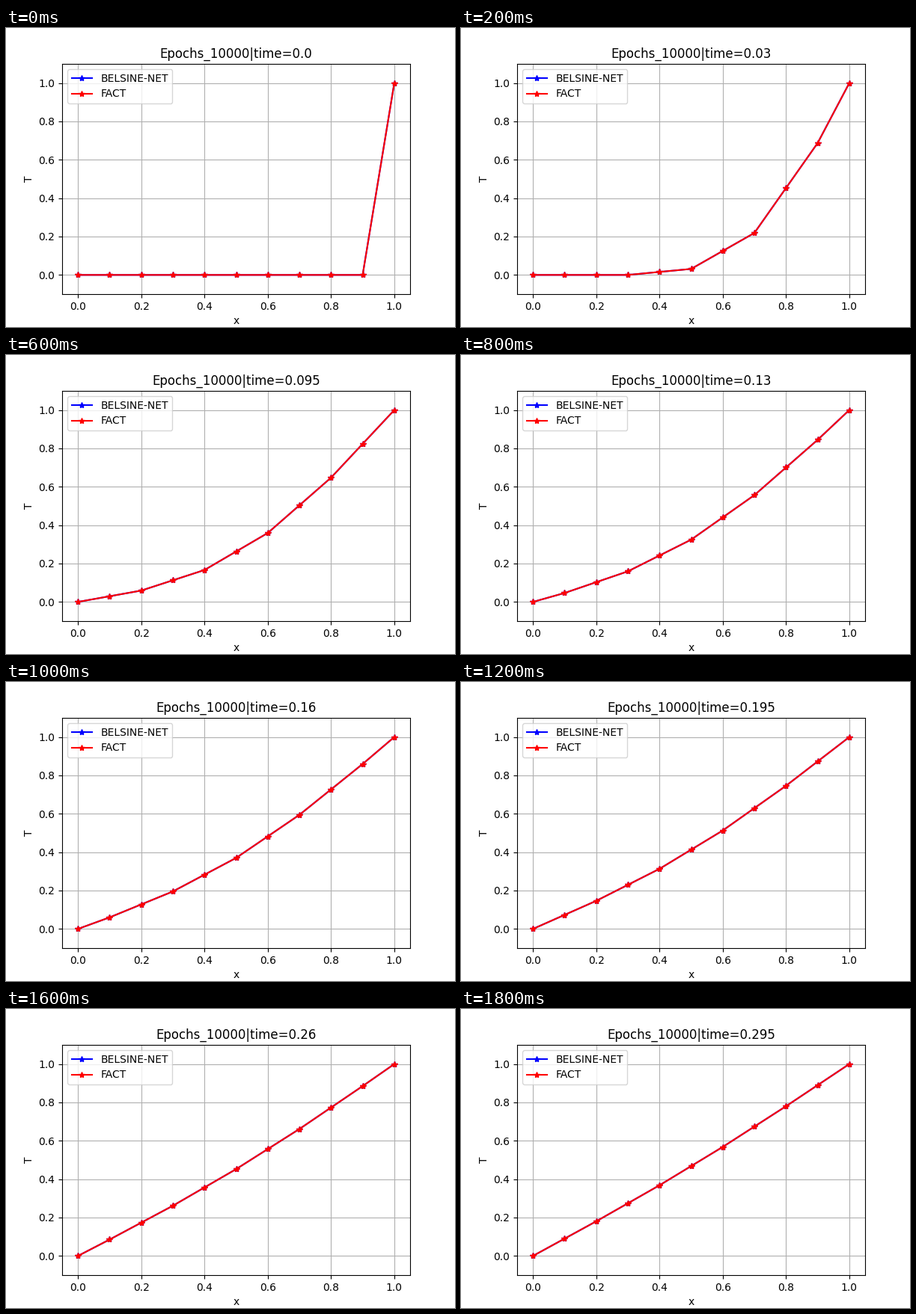
Recreate the animation shown at these times as a matplotlib script. Size 600 by 400 pixels, loop 2000 ms.

```python
import matplotlib.pyplot as plt
import numpy as np
from matplotlib.animation import FuncAnimation

FRAMES = 10
LAST_STEP = 59
DT = 0.005
DX = 0.1
RATIO = DT / DX**2  # diffusion number, 0.5

x = np.linspace(0, 1, 11)
steps = np.linspace(0, LAST_STEP, FRAMES).astype(int)


def solve_heat():
    """Explicit heat equation with T=0 on the left end and T=1 on the right."""
    temp = np.zeros((LAST_STEP + 1, x.size))
    temp[:, -1] = 1
    for n in range(LAST_STEP):
        now = temp[n]
        temp[n + 1, 1:-1] = now[1:-1] + RATIO * (now[2:] - 2 * now[1:-1] + now[:-2])
    return temp


history = solve_heat()

fig, ax = plt.subplots(figsize=(6, 4), dpi=100)
predicted, = ax.plot(x, history[0], "b-*", label="BELSINE-NET")
exact, = ax.plot(x, history[0], "r-*", label="FACT")
ax.set_ylim(-0.1, 1.1)
ax.set_xlabel("x")
ax.set_ylabel("T")
ax.grid(True)
ax.legend(loc="upper left")
title = ax.set_title("")


def update(i):
    step = steps[i]
    for line in (predicted, exact):
        line.set_ydata(history[step])
    title.set_text(f"Epochs_10000|time={round(float(step * DT), 3)}")
    return predicted, exact, title


anim = FuncAnimation(fig, update, frames=FRAMES, interval=200, repeat=True, repeat_delay=0)
plt.show()
```
